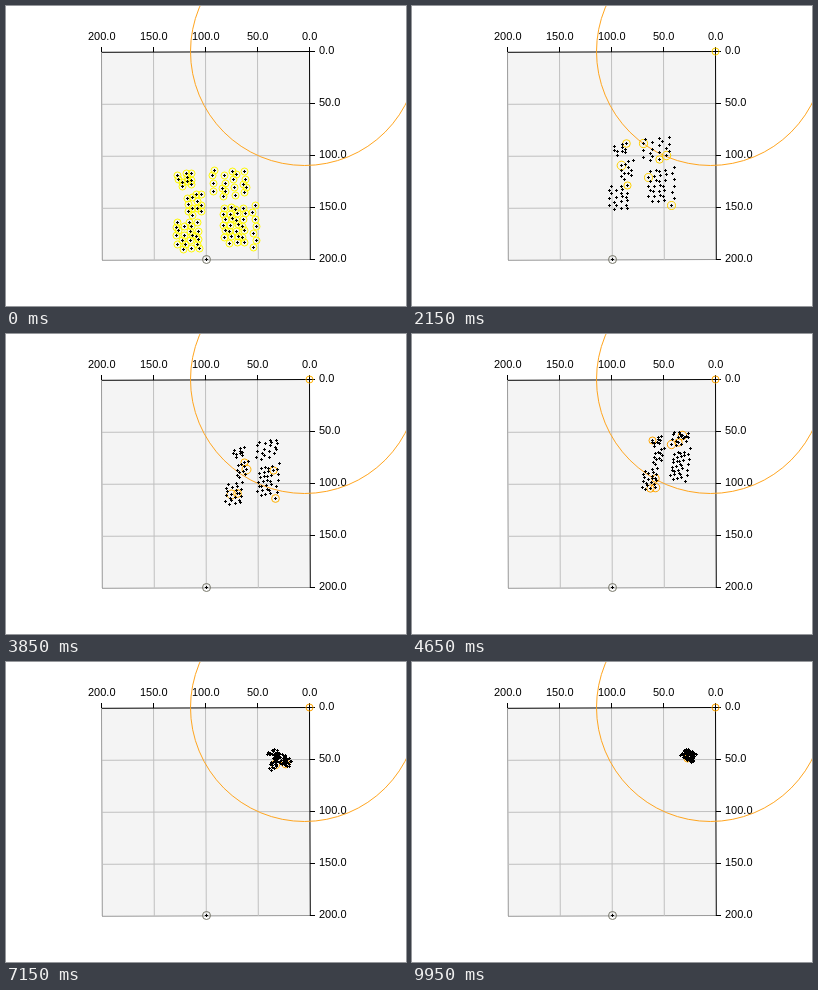
Recreate the animation shown at these times as an HTML page with a canvas. Size 400 px wide and 300 px high, loop 10 s.

```html
<!DOCTYPE html>
<html lang="en">
<head>
<meta charset="utf-8">
<title>Swarm heading home</title>
<style>
  html, body { margin: 0; width: 100%; height: 100%; overflow: hidden; background: #fff; }
  canvas { display: block; }
</style>
</head>
<body>
<canvas id="stage" width="400" height="300"></canvas>
<script>
const ctx = document.getElementById('stage').getContext('2d');
const LOOP = 10000, STEP = 50;
const HOME = { x: 303, y: 45 };
const MID_ANGLE = Math.atan2(49, -26);

const rand = n => {
  const s = Math.sin(n * 12.9898 + 4.1) * 43758.5453;
  return s - Math.floor(s);
};

// Loose groups of the starting swarm
const groups = [
  { x: 171, y: 165, w: 18, h: 15, count: 10 },
  { x: 181, y: 185, w: 18, h: 24, count: 12 },
  { x: 169, y: 212, w: 28, h: 31, count: 22 },
  { x: 205, y: 161, w: 42, h: 29, count: 19 },
  { x: 216, y: 197, w: 26, h: 40, count: 27 },
  { x: 246, y: 192, w: 5, h: 50, count: 7 }
];

const points = [];
function addPoint(x, y) {
  const dx = x - HOME.x, dy = y - HOME.y;
  points.push({ dist: Math.hypot(dx, dy), angle: Math.atan2(dy, dx), spread: rand(points.length) * 10 - 5 });
}

// Low-discrepancy steps fill each group evenly without lining up
for (const { x, y, w, h, count } of groups) {
  for (let i = 1; i <= count; i++) {
    addPoint(x + w * (i * 0.7549 % 1), y + h * (i * 0.5698 % 1));
  }
}

// Steady flight towards home, then a soft stop in a tightening cluster
function place(p, t) {
  const rest = 62 - 1.2 * Math.max(0, t - 4) + p.spread;
  const left = p.dist - (13 + 0.042 * p.dist) * Math.max(0, t - 0.1) - rest;
  const dist = t ? rest + 5 * Math.log1p(Math.exp(left / 5)) : p.dist;
  const squeeze = 1 - 0.55 * Math.pow(Math.max(0, t - 3.5) / 6.5, 1.5);
  const angle = MID_ANGLE + (p.angle - MID_ANGLE) * squeeze;
  return [Math.round(HOME.x + dist * Math.cos(angle)), Math.round(HOME.y + dist * Math.sin(angle))];
}

function line(x1, y1, x2, y2, color) {
  ctx.strokeStyle = color;
  ctx.beginPath();
  ctx.moveTo(x1, y1);
  ctx.lineTo(x2, y2);
  ctx.stroke();
}

function ring(x, y, r, color) {
  ctx.strokeStyle = color;
  ctx.beginPath();
  ctx.arc(x + 0.5, y + 0.5, r, 0, Math.PI * 2);
  ctx.stroke();
}

function plus(x, y) {
  ctx.fillStyle = '#000';
  ctx.fillRect(x - 1, y, 3, 1);
  ctx.fillRect(x, y - 1, 1, 3);
}

function drawGrid() {
  ctx.fillStyle = '#f4f4f4';
  ctx.fillRect(96, 46, 208, 208);
  for (let i = 4; i >= 0; i--) {
    const x = 303.5 - i * 52, y = 45.5 + i * 52;
    const color = i === 0 ? '#000' : i === 4 ? '#999' : '#c0c0c0';
    line(x, 46, x + 0.8, 254, color);
    line(96, y + 0.8, 304, y, color);
    line(x, 41, x, 46, '#000');
    line(304, y, 309, y, '#000');

    const label = (i * 50).toFixed(1);
    ctx.fillStyle = '#000';
    ctx.fillText(label, Math.round(x - ctx.measureText(label).width / 2), 34);
    ctx.fillText(label, 313, y + 2.5);
  }
}

function draw(ms) {
  const tick = Math.floor(ms / STEP), t = tick * STEP / 1000;
  const warm = Math.min(1, t / 4.5);
  const signal = `rgb(255,${Math.round(250 - 85 * warm)},0)`;
  ctx.fillStyle = '#fff';
  ctx.fillRect(0, 0, 400, 300);
  ctx.lineWidth = 1;
  ctx.font = '11px "Liberation Sans", Arial, sans-serif';
  drawGrid();
  ring(298, 45, 114, '#ffa51f');

  ring(200, 253, 4, '#77776a');
  plus(200, 253);
  if (tick) {
    ring(HOME.x, HOME.y, 3.5, signal);
    plus(HOME.x, HOME.y);
  }

  const places = points.map(p => place(p, t));
  const chance = 0.09 - 0.007 * t;
  places.forEach(([x, y], i) => {
    const roll = rand(tick * 101 + i * 7.3);
    if (!tick || roll < chance) ring(x, y, 3.5 + (tick && rand(roll)), signal);
  });
  places.forEach(([x, y]) => plus(x, y));
}

function frame() {
  draw(performance.now() % LOOP);
  requestAnimationFrame(frame);
}
frame();
</script>
</body>
</html>
```
